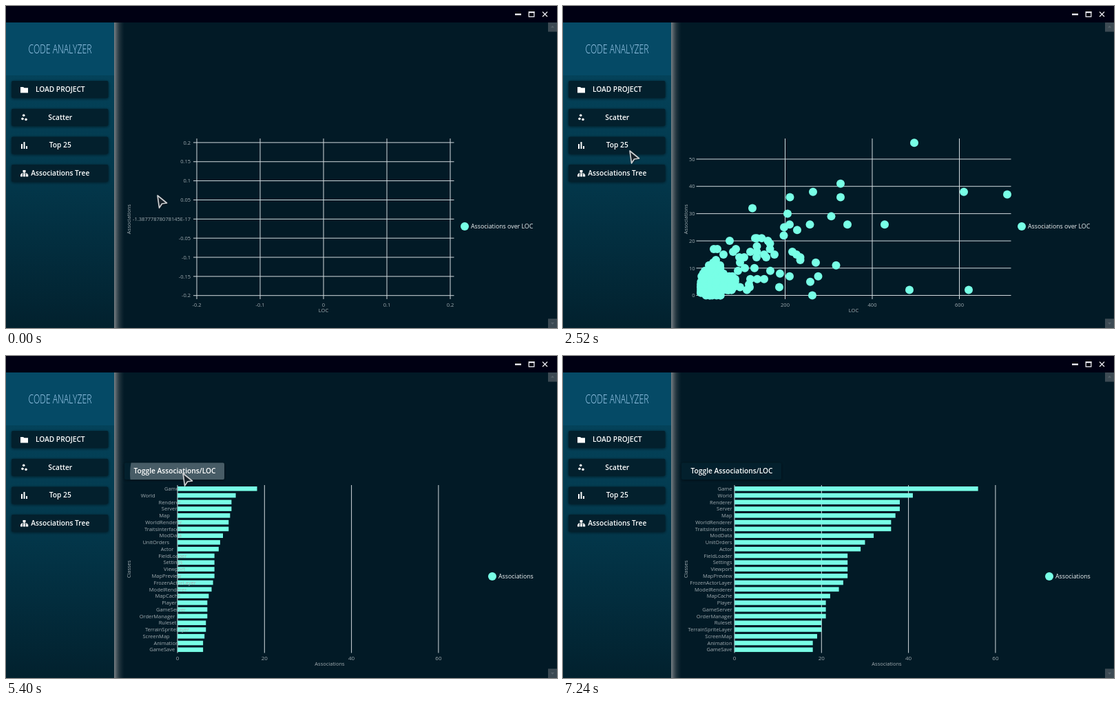
An HTML page with a canvas that plays this animation: 800 by 469 pixels, repeating every 7280 ms.

```html
<!DOCTYPE html>
<html lang="en">
<head>
<meta charset="utf-8">
<title>Code Analyzer</title>
<style>
html, body { margin: 0; width: 100%; height: 100%; overflow: hidden; background: #021a26; }
canvas { display: block; }
</style>
</head>
<body>
<canvas id="stage" width="800" height="469"></canvas>
<script>
const ctx = document.getElementById('stage').getContext('2d');
const LOOP = 7280, GROW = 300;
const SCATTER_AT = 1007, TOP_AT = 2944, TOGGLE_AT = 5302;
const CYAN = '#78ffe6', GRID = '#d3dade', LABEL = '#a3adb2';
const FAMILY = '"Open Sans", "Noto Sans", sans-serif';
const SMALL = `7.5px ${FAMILY}`, LEGEND = `8.8px ${FAMILY}`, BUTTON = `600 10.2px ${FAMILY}`;

const clamp = v => Math.max(0, Math.min(1, v));
const lerp = (a, b, p) => a + (b - a) * p;
const progress = (t, start) => clamp((t - start) / GROW);

function rect(x, y, w, h, color) {
  ctx.fillStyle = color;
  ctx.fillRect(x, y, w, h);
}
function dot(x, y, r, color = CYAN) {
  ctx.fillStyle = color;
  ctx.beginPath();
  ctx.arc(x, y, r, 0, 7);
  ctx.fill();
}
function polygon(points) {
  ctx.beginPath();
  points.forEach(([x, y]) => ctx.lineTo(x, y));
  ctx.closePath();
}
function text(str, x, y, { font = SMALL, align = 'center', color = LABEL } = {}) {
  ctx.font = font;
  ctx.textAlign = align;
  ctx.fillStyle = color;
  ctx.fillText(str, x, y + parseFloat(font.match(/[\d.]+px/)[0]) * 0.36);
}
function textWidth(str) {
  ctx.font = SMALL;
  return ctx.measureText(str).width;
}
function gradient(x0, y0, x1, y1, ...colors) {
  const g = ctx.createLinearGradient(x0, y0, x1, y1);
  colors.forEach((c, i) => g.addColorStop(i / (colors.length - 1), c));
  return g;
}
function sideTitle(str, y) {
  ctx.save();
  ctx.translate(178, y);
  ctx.rotate(-Math.PI / 2);
  text(str, 0, 0);
  ctx.restore();
}
function legend(str, x) {
  dot(x, 321, 6);
  text(str, x + 9, 321.3, { font: LEGEND, align: 'left', color: '#f2f5f6' });
}
const vLine = (x, top, bottom) => rect(x - 0.5, top, 1, bottom - top, GRID);
const hLine = (y, left) => rect(left, y - 0.5, 650.5 - left, 1, GRID);

// Window frame and sidebar

const MENU = ['LOAD PROJECT', 'Scatter', 'Top 25', 'Associations Tree'];
const menuY = i => 109 + i * 40.7;

function button(label, x, y, w, h) {
  ctx.save();
  ctx.shadowColor = 'rgba(0,8,14,.7)';
  ctx.shadowBlur = 4;
  ctx.shadowOffsetY = 1;
  ctx.fillStyle = '#03202d';
  ctx.beginPath();
  ctx.roundRect(x, y, w, h, 2);
  ctx.fill();
  ctx.restore();
  text(label, x + w / 2 + 0.5, y + h / 2 - 0.2, { font: BUTTON, color: '#fff' });
}

function icons() {
  ctx.fillStyle = '#fff';
  polygon([[21, 118], [25, 118], [26.5, 119.3], [32, 119.3], [32, 126.5], [21, 126.5]]);
  ctx.fill();
  for (const [x, y] of [[25.7, 159.3], [24, 164.3], [29, 165.3]]) dot(x, y, 1.8, '#fff');
  for (const [x, h] of [[22, 7], [25.5, 10], [29, 4]]) rect(x, 208 - h, 2, h, '#fff');
  rect(24.5, 239, 4, 3.5, '#fff');
  rect(26, 242, 1, 4, '#fff');
  rect(22, 243.7, 9, 1, '#fff');
  for (const x of [21, 25, 29]) {
    rect(x + 1, 244, 1, 2, '#fff');
    rect(x, 245.3, 3.2, 3.2, '#fff');
  }
}

function frame() {
  rect(0, 0, 800, 469, '#021a26');
  rect(157, 24, 16, 445, gradient(157, 0, 172, 0, 'rgba(150,153,156,.8)', 'rgba(110,118,122,.3)', 'rgba(60,75,85,0)'));
  rect(0, 24, 157, 445, gradient(0, 24, 0, 469, '#044861', '#03384c', '#02212e'));
  rect(0, 24, 157, 77, '#054a66');
  rect(0, 0, 800, 24, '#000013');

  rect(739, 11, 9, 2.4, '#e8e8ec');
  ctx.strokeStyle = '#e8e8ec';
  ctx.lineWidth = 1.3;
  ctx.strokeRect(759.2, 8.6, 7.6, 7);
  rect(759, 8, 8.4, 2.2, '#e8e8ec');
  ctx.beginPath();
  ctx.moveTo(779, 8.5); ctx.lineTo(786, 15.5);
  ctx.moveTo(786, 8.5); ctx.lineTo(779, 15.5);
  ctx.stroke();

  for (const [y, dir] of [[24, -1], [455.5, 1]]) {
    rect(787, y, 13, 13.5, '#3c4a53');
    ctx.fillStyle = '#56636b';
    polygon([[791, y + 6.5 - dir], [796, y + 6.5 - dir], [793.5, y + 6.5 + 2 * dir]]);
    ctx.fill();
  }

  // The heading uses a tall, narrow face.
  ctx.save();
  ctx.translate(78.5, 62.5);
  ctx.scale(1, 1.5);
  ctx.fontStretch = 'condensed';
  text('CODE ANALYZER', 0, 0, { font: `300 12.2px ${FAMILY}`, color: '#a5d3f5' });
  ctx.restore();

  MENU.forEach((label, i) => button(label, 8, menuY(i), 140.5, 25));
  icons();
}

// Scatter chart

const OUTLIERS = [
  510,56, 403,41, 403,36, 363,38, 329.5,36, 582,38, 645,37, 389.5,29, 275,32, 326,30, 321,25,
  320.5,22, 329,26, 340,24, 358.5,26, 413,26, 467,26, 396.5,11, 367,12, 370.5,7, 359,5, 362,0,
  503,2, 589,2, 333,16, 339,15, 344.5,14, 344.5,13, 315,8, 329,7, 301,9, 314,3, 307,15, 297.5,20,
  300.5,19, 300.5,17, 279,21, 281.5,21, 288.5,21, 281.5,18, 281.5,16, 272,16, 281,14, 292,15,
  295,14, 242,20, 219,17, 224,17, 222,13, 233,15, 247,16, 251,17, 263,14, 256,14, 257,12, 264,10,
  278,10, 282,6, 272,6, 292,6, 270,4, 267,2, 257,3, 254,9, 271,3
];
const scatterX = v => 196 + v * 0.6325;
const scatterY = v => 421.5 - v * 3.97;

function makePoints() {
  const points = [];
  for (let i = 0; i < OUTLIERS.length; i += 2) points.push([OUTLIERS[i], scatterY(OUTLIERS[i + 1])]);
  let seed = 11;
  const random = () => (seed = seed * 16807 % 2147483647) / 2147483647;
  for (let i = 0; i < 155; i++) {
    const u = random() ** 1.15;
    const top = 7 + 5 * Math.sin(Math.PI * clamp(u * 1.3));
    const low = u > 0.6 ? 2 : u < 0.1 ? 1 : 0;
    points.push([200 + 50 * u, scatterY(Math.round(lerp(low, top, random() ** 1.4)))]);
  }
  return points;
}
const POINTS = makePoints();
const OLD_Y = ['-0.2', '-0.15', '-0.1', '-0.05', '-1.38777878078145E-17', '0.05', '0.1', '0.15', '0.2'];
const OLD_X = ['-0.2', '-0.1', '0', '0.1', '0.2'];

function scatterChart(t) {
  const p = progress(t, SCATTER_AT), left = lerp(272, 193.5, p);
  const fadeIn = clamp((p - 0.4) / 0.6);

  OLD_X.forEach((label, i) => {
    const x = lerp(277 + i * 92, scatterX(+label), p);
    ctx.globalAlpha = 1 - p;
    vLine(x, 193, 427);
    text(label, x, 435.5);
  });
  OLD_Y.forEach((label, i) => {
    const kept = i === 4;
    const y = lerp(421.7 - i * 27.85, scatterY(kept ? 0 : +label), p);
    ctx.globalAlpha = kept ? 1 : 1 - p;
    hLine(y, left);
    if (!kept) text(label, lerp(268, 191.5, p), y, { align: 'right' });
    else text(p > 0 ? '0' : label, lerp(268 - textWidth(label), 191.5 - textWidth('0'), p), y, { align: 'left' });
  });

  ctx.globalAlpha = fadeIn;
  for (const v of [200, 400, 600]) {
    vLine(scatterX(v), 193, 427);
    text(v, scatterX(v), 435.5);
  }
  for (const v of [10, 20, 30, 40, 50]) {
    hLine(scatterY(v), left);
    text(v, 191.5, scatterY(v), { align: 'right' });
  }
  ctx.globalAlpha = 1;

  if (p > 0) for (const [x, y] of POINTS) dot(x, y, 6 * p);
  text('LOC', p > 0 ? 422 : 461, 443.5);
  sideTitle('Associations', 310.5);
  legend('Associations over LOC', 666);
}

// Bar charts

const rows = str => str.split(' ').map(s => s.split(':'));
const BY_LOC = {
  title: 'LOC', titleX: 488, legendX: 740, left: 251, right: 248, base: 100, scale: 0.677, ticks: [100, 300, 500, 700],
  rows: rows('Map:710 VariableExpression:622 Server:610 Game:497 Keycode:485 FieldLoader:430 MapPreview:344 World:329 ' +
    'TraitsInterfaces:329 Widget:317 Actor:307 Exts:276 Util:270 Renderer:264 Color:264 MiniYaml:259 Settings:258 ' +
    'Order:235 Sound:235 ModelRenderer:229 Shroud:227 SpriteFont:218 WorldRenderer:212 Viewport:211 Connection:211')
};
const BY_LINKS = {
  title: 'Associations', titleX: 470, legendX: 706, left: 249, right: 245.5, base: 0, scale: 6.315, ticks: [0, 20, 40, 60],
  rows: rows('Game:56 World:41 Renderer:38 Server:38 Map:37 WorldRenderer:36 TraitsInterfaces:36 ModData:32 UnitOrders:30 ' +
    'Actor:29 FieldLoader:26 Settings:26 Viewport:26 MapPreview:26 FrozenActorLayer:25 ModelRenderer:24 MapCache:22 ' +
    'Player:21 GameServer:21 OrderManager:21 Ruleset:20 TerrainSpriteLayer:20 ScreenMap:19 Animation:18 GameSave:18')
};

function barChart(chart, p, previous) {
  const labelLeft = (c, i) => c.right - textWidth(c.rows[i][0]);
  const rowY = i => 193.3 + i * 9.77;
  for (const v of chart.ticks) {
    const x = chart.left + (v - chart.base) * chart.scale;
    vLine(x, 188, 432.5);
    text(v, x, 440.5, { font: LEGEND.replace('8.8', '8') });
  }
  chart.rows.forEach(([, value], i) =>
    rect(chart.left, rowY(i) - 3.3, (value - chart.base) * chart.scale * p, 6.6, CYAN));
  chart.rows.forEach(([name], i) => {
    const x = previous ? lerp(labelLeft(previous, i), labelLeft(chart, i), p) : labelLeft(chart, i);
    text(name, x, rowY(i), { align: 'left' });
  });
  text(chart.title, chart.titleX, 448);
  sideTitle('Classes', 310.5);
  legend(chart.title, chart.legendX);
  button('Toggle Associations/LOC', 172, 155.5, 145, 24.5);
}

// Pointer

function ripple(t, start, cx, cy, x, y, w, h) {
  const age = t - start;
  if (age <= 0 || age > 650) return;
  ctx.save();
  ctx.beginPath();
  ctx.roundRect(x, y, w, h, 2);
  ctx.clip();
  ctx.globalAlpha = 0.27 * (1 - clamp((age - 350) / 300));
  dot(cx, cy, age * 0.7, '#fff');
  ctx.restore();
}

const PATH = [[0, 220, 276], [700, 205, 250], [1400, 205, 250], [2250, 97, 211], [3350, 97, 211],
  [4400, 257, 171], [5750, 257, 171], [6480, 764, 117]];

function pointer(t) {
  const i = PATH.findIndex(([time]) => time > t);
  if (i < 0) return;
  const [t0, x0, y0] = PATH[i - 1], [t1, x1, y1] = PATH[i];
  const u = (t - t0) / (t1 - t0), p = u * u * (3 - 2 * u);
  ctx.save();
  ctx.translate(lerp(x0, x1, p), lerp(y0, y1, p));
  ctx.shadowColor = 'rgba(0,0,0,.6)';
  ctx.shadowBlur = 3;
  ctx.shadowOffsetX = ctx.shadowOffsetY = 1;
  polygon([[0, 0], [13.5, 11], [6.5, 12], [2.5, 18]]);
  ctx.fillStyle = '#18222a';
  ctx.fill();
  ctx.shadowColor = 'transparent';
  ctx.strokeStyle = '#cfd1d3';
  ctx.lineWidth = 1.7;
  ctx.lineJoin = 'round';
  ctx.stroke();
  ctx.restore();
}

function draw(t) {
  frame();
  if (t < TOP_AT) scatterChart(t);
  else if (t < TOGGLE_AT) barChart(BY_LOC, progress(t, TOP_AT));
  else barChart(BY_LINKS, progress(t, TOGGLE_AT), BY_LOC);
  ripple(t, 2900, 97, 211, 8, menuY(2), 140.5, 25);
  ripple(t, 5290, 257, 171, 172, 155.5, 145, 24.5);
  pointer(t);
}

let origin;
function tick(now) {
  origin ??= now;
  draw((now - origin) % LOOP);
  requestAnimationFrame(tick);
}
requestAnimationFrame(tick);
</script>
</body>
</html>
```
